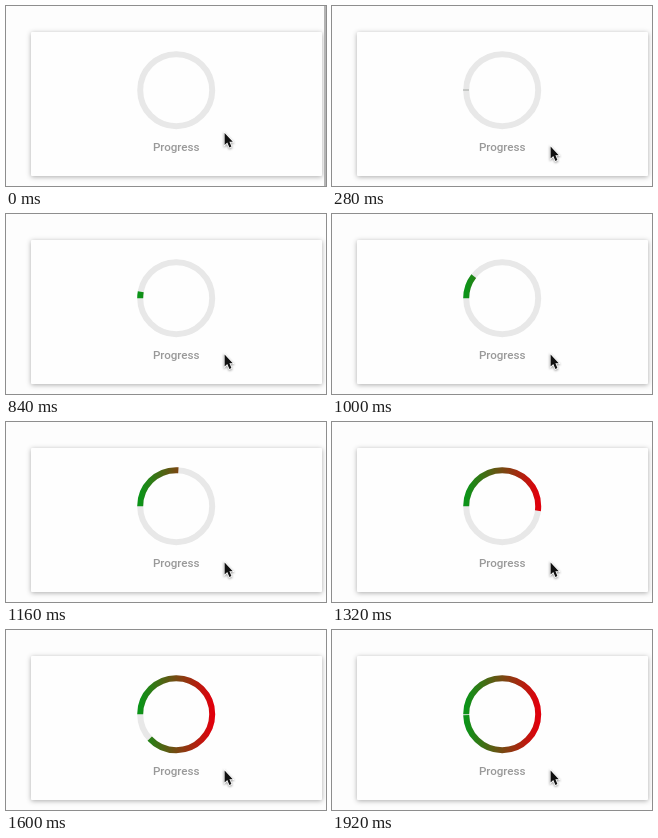
Recreate the animation shown at these times as an HTML page. Size 320 by 180 pixels, loop 1.96 s.

```html
<!DOCTYPE html>
<html lang="en">
<head>
<meta charset="utf-8">
<title>Progress ring</title>
<style>
  html, body { margin: 0; width: 100%; height: 100%; overflow: hidden; background: #fdfdfd; }
  svg { display: block; width: 100vw; height: 100vh; }
  .card { fill: #fefefe; filter: drop-shadow(0 1.5px 2.5px rgba(0, 0, 0, .32)); }
  .ring { fill: none; stroke-width: 6; }
  text { font: 500 11.6px Roboto, Arial, sans-serif; fill: #999; text-anchor: middle; }
  #cursor { fill: #111; stroke: #fff; stroke-width: 1.6; paint-order: stroke;
    filter: drop-shadow(0 1px 1px rgba(0, 0, 0, .4)); }
</style>
</head>
<body>
<svg viewBox="0 0 320 180">
  <defs>
    <linearGradient id="hue" gradientUnits="userSpaceOnUse" x1="134" x2="206" y1="0" y2="0">
      <stop stop-color="#0b9418"/>
      <stop offset="1" stop-color="#e0000c"/>
    </linearGradient>
  </defs>
  <rect class="card" x="25" y="26" width="291" height="144" rx="1"/>
  <rect id="edge" x="318" width="2" height="180" fill="#b4b4b4"/>
  <circle class="ring" cx="170.2" cy="84.2" r="36" stroke="#e8e8e8"/>
  <path id="mark" d="M131 84h6" stroke="#a4a8a4"/>
  <path id="arc" class="ring" d="M134.2 84.2a36 36 0 0 1 72 0a36 36 0 0 1-72 0" pathLength="1" stroke="url(#hue)"/>
  <text x="170.2" y="145">Progress</text>
  <path id="cursor" d="M0 0V12L2.7 9.6L4.8 14.4L6.8 13.5L4.8 8.8H8.2Z"/>
</svg>
<script>
  const LOOP = 1960, FILL_START = 548, FILL_TIME = 1525;
  const [edge, mark, arc, cursor] =
    ["edge", "mark", "arc", "cursor"].map(id => document.getElementById(id));
  const clamp = x => Math.max(0, Math.min(1, x));
  const easeInOut = x => x < .5 ? 4 * x ** 3 : 1 - 4 * (1 - x) ** 3;
  const show = (el, on) => el.setAttribute("visibility", on ? "visible" : "hidden");

  function draw(now) {
    const t = now % LOOP;
    const fill = easeInOut(clamp((t - FILL_START) / FILL_TIME));
    const drop = 13.5 * easeInOut(clamp(t / 240));
    show(edge, t < 40);
    show(mark, t >= 200 && t < 680);
    show(arc, fill > 0);
    arc.setAttribute("stroke-dasharray", `${fill} 2`);
    cursor.setAttribute("transform", `translate(218.6 ${127 + drop})`);
  }

  const start = performance.now();
  function loop() {
    draw(performance.now() - start);
    requestAnimationFrame(loop);
  }
  loop();
</script>
</body>
</html>
```
